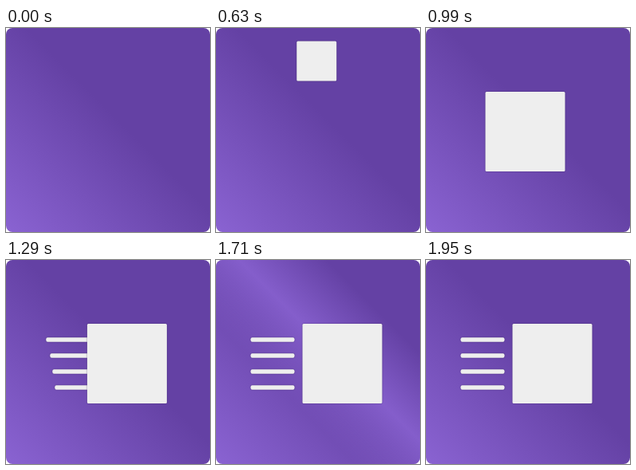
Recreate the animation shown at these times as an HTML page with a canvas. Size 256 px wide and 256 px high, loop 5190 ms.

```html
<!DOCTYPE html>
<html lang="en">
<head>
<meta charset="utf-8">
<title>Square and lines</title>
<style>
  html, body { margin: 0; width: 100%; height: 100%; overflow: hidden; background: #fff; }
  canvas { display: block; width: 100%; height: 100%; }
</style>
</head>
<body>
<canvas width="256" height="256"></canvas>
<script>
const ctx = document.querySelector('canvas').getContext('2d');
const LOOP = 5190, SIZE = 256, MID = SIZE / 2;
const LIGHT = '#8a63d2', DARK = '#6441a4', PAPER = '#eee';
const LINE_TIMES = [270, 205, 183, 167];

const progress = (t, from, to) => Math.min(1, Math.max(0, (t - from) / (to - from)));
const mix = (a, b, p) => a + (b - a) * p;
const easeOut = p => 1 - (1 - p) ** 2;
const easeInOut = p => p < 0.5 ? 2 * p * p : 1 - 2 * (1 - p) ** 2;

// Gradient along the rising diagonal, between two values of x - y
function diagonal(from, to, stops) {
  const g = ctx.createLinearGradient(MID + from / 2, MID - from / 2, MID + to / 2, MID - to / 2);
  stops.forEach(([at, color]) => g.addColorStop(at, color));
  return g;
}

function box(x, y, w, h, r, fill) {
  ctx.fillStyle = fill;
  ctx.beginPath();
  ctx.roundRect(x, y, w, h, r);
  ctx.fill();
}

function background(t) {
  box(0, 0, SIZE, SIZE, 8, diagonal(-SIZE, SIZE, [[0, LIGHT], [0.55, DARK], [1, DARK]]));
  if (t < 1560 || t >= 1950) return;
  const center = 30 - (t - 1710) * 1.05, half = 110;
  const clear = 'rgba(138,99,210,0)';
  ctx.globalAlpha = 0.85 * progress(t, 1560, 1690) * (1 - progress(t, 1830, 1950));
  box(0, 0, SIZE, SIZE, 8, diagonal(center - half, center + half, [[0, clear], [0.5, LIGHT], [1, clear]]));
  ctx.globalAlpha = 1;
}

function lines(t) {
  LINE_TIMES.forEach((time, i) => {
    const out = easeOut(progress(t, 1410 - time, 1410));
    box(mix(78.5, 43.5, out), 97.3 + 20 * i, 55, 5.4, 2, PAPER);
  });
}

function square(t) {
  const scale = mix(0.5, 1, easeInOut(progress(t, 810, 990)));
  const drop = mix(-156, 3, progress(t, 450, 870)) - 3 * progress(t, 870, 990);
  const slide = 34 * easeOut(progress(t, 1140, 1410));
  const side = 100 * scale;
  const x = MID - 53.5 * scale + slide;
  const y = MID - 48 * scale + drop;
  box(x, y, side, side, 1.5, PAPER);
}

function draw(now) {
  const t = now % LOOP;
  ctx.clearRect(0, 0, SIZE, SIZE);
  background(t);
  if (t >= 480) {
    ctx.save();
    ctx.shadowColor = 'rgba(40,20,80,.6)';
    ctx.shadowBlur = 2;
    if (t >= 1140) lines(t);
    square(t);
    ctx.restore();
  }
  requestAnimationFrame(() => draw(performance.now()));
}
draw(0);
</script>
</body>
</html>
```
